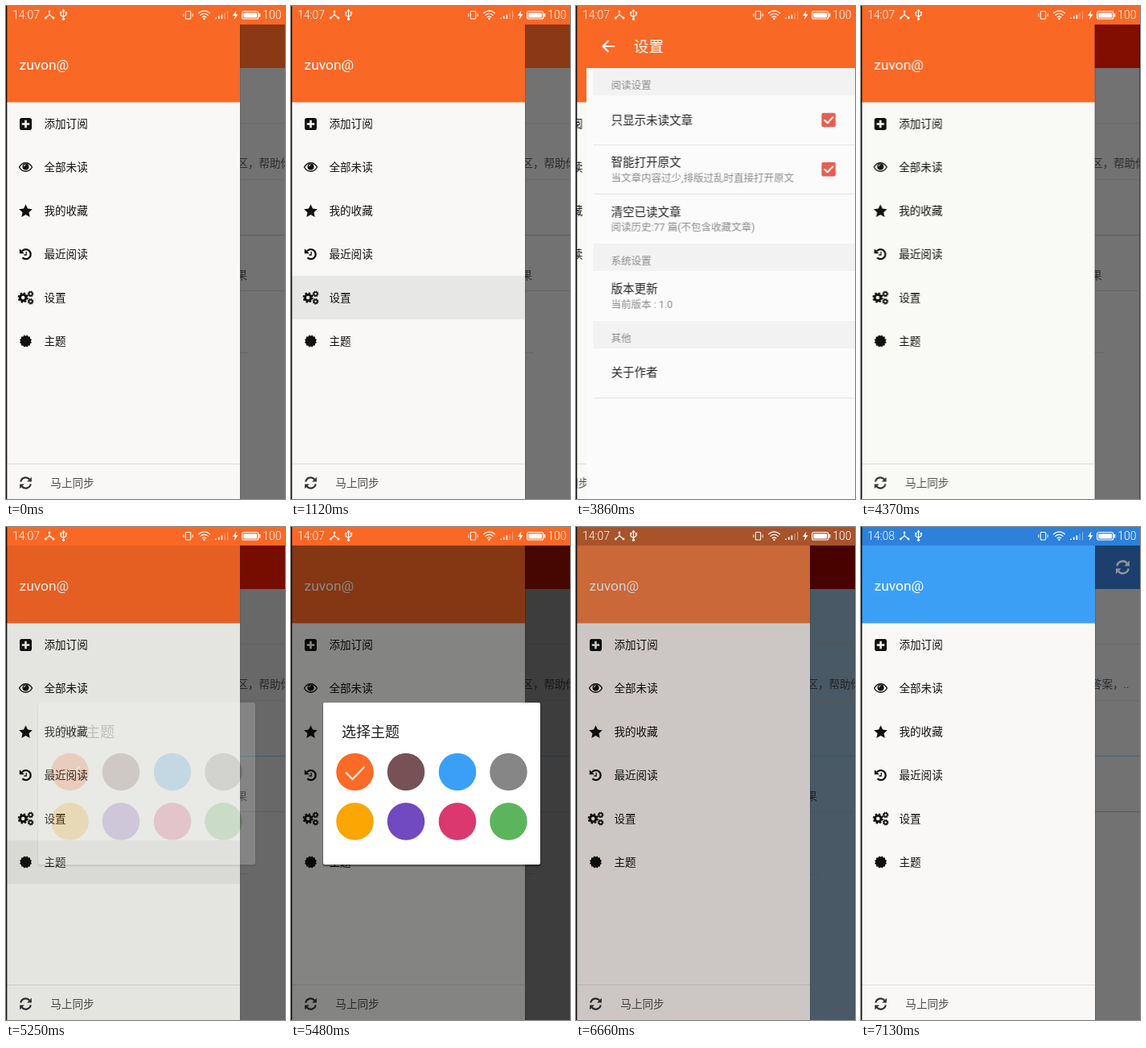
An HTML page for the animation above (8000 ms loop, 347 by 612 pixels).

```html
<!DOCTYPE html>
<html lang="zh-CN">
<head>
<meta charset="utf-8">
<title>Reader drawer</title>
<style>
html, body { margin: 0; width: 100%; height: 100%; overflow: hidden; background: #000; }
svg { display: block; width: 347px; height: 612px; }
text { font-family: Roboto, "Noto Sans CJK SC", "Noto Sans CJK", "Noto Sans", sans-serif; }
.light { font-weight: 300; fill: #fff; }
.item { font-size: 13.6px; fill: #111; }
.head { font-size: 14.5px; fill: #222; }
.sub { font-size: 12.5px; fill: #8a8a8a; }
.faded { font-size: 13.5px; fill: #292b2d; }
.line { fill: none; stroke: #fff; stroke-linecap: round; stroke-linejoin: round; }

.anim, .tint { animation: 8s linear infinite both; }
.settings { animation-name: settings; }
.under { animation-name: under; }
.dialog { animation-name: dialog; }
.dim { animation-name: dim; }
.statusDim { animation-name: statusDim; }
.pressSet { animation-name: pressSet; }
.pressTheme { animation-name: pressTheme; }
.before { animation-name: before; }
.after { animation-name: after; }
.header { animation-name: header; }
.status { animation-name: status; }
.bar { animation-name: bar; }
.page { animation-name: page; }
.drawer { animation-name: drawer; }

@keyframes settings {
  0% { transform: translateX(347px); }
  18.375% { transform: translateX(347px); animation-timing-function: cubic-bezier(.2, .5, .4, 1); }
  22.125%, 48.24% { transform: none; }
  48.25% { transform: translateX(12px); animation-timing-function: cubic-bezier(.35, .25, .3, 1); }
  55.25%, 100% { transform: translateX(347px); }
}
@keyframes under {
  0% { transform: none; }
  18.375% { transform: none; animation-timing-function: cubic-bezier(.2, .5, .4, 1); }
  22.125%, 48.24% { transform: translateX(-97px); }
  48.25% { transform: translateX(-93.6px); animation-timing-function: cubic-bezier(.35, .25, .3, 1); }
  55.25%, 100% { transform: none; }
}
@keyframes dialog {
  0%, 65% { opacity: 0; }
  68.4%, 80% { opacity: 1; }
  83%, 100% { opacity: 0; }
}
@keyframes dim {
  0%, 65% { opacity: 0; }
  68.4%, 80% { opacity: .47; }
  83.25% { opacity: .19; }
  84.625%, 100% { opacity: 0; }
}
@keyframes statusDim {
  0%, 80.375% { opacity: 0; }
  82.5%, 83.9% { opacity: .4; }
  84.625%, 100% { opacity: 0; }
}
@keyframes pressSet {
  0%, 13.99% { opacity: 0; }
  14%, 22% { opacity: .07; }
  22.1%, 100% { opacity: 0; }
}
@keyframes pressTheme {
  0%, 62.74% { opacity: 0; }
  62.75%, 65% { opacity: .07; }
  67%, 100% { opacity: 0; }
}
@keyframes before {
  0%, 86.2% { opacity: 1; }
  89.125%, 100% { opacity: 0; }
}
@keyframes after {
  0%, 86.2% { opacity: 0; }
  89.125%, 100% { opacity: 1; }
}
@keyframes header {
  0%, 80.375% { fill: #fa6825; }
  82.5%, 83.9% { fill: #f88045; }
  84.625%, 86.2% { fill: #fa6825; }
  89.125%, 100% { fill: #3ba0f5; }
}
@keyframes status {
  0%, 86.2% { fill: #fa6825; }
  89.125%, 100% { fill: #2d81db; }
}
@keyframes bar {
  0%, 48.24% { fill: #8b3814; }
  48.25%, 82.49% { fill: #810e00; }
  82.5%, 84.61% { fill: #590400; }
  84.625%, 86.2% { fill: #810e00; }
  89.125%, 100% { fill: #1c3f6d; }
}
@keyframes page {
  0%, 82.49% { fill: #727272; }
  82.5%, 84.61% { fill: #5a6e7c; }
  84.625%, 100% { fill: #727272; }
}
@keyframes drawer {
  0%, 48.24% { fill: #f9f8f6; }
  48.25%, 65% { fill: #f9faf5; }
  68.4%, 80.375% { fill: #f9f8f6; }
  82.5%, 83.9% { fill: #fbf5f3; }
  84.625%, 100% { fill: #f9f8f6; }
}
</style>
</head>
<body>
<svg viewBox="0 0 347 612">
  <defs>
    <g id="sync">
      <g id="half">
        <path d="M-6.2 -1.4A6.2 6.2 0 0 1 4.8 -4.2" fill="none" stroke="currentColor" stroke-width="2.2" />
        <path d="M7.4 -7.2V-1.4H1.6Z" fill="currentColor" />
      </g>
      <use href="#half" transform="rotate(180)" />
    </g>
    <g id="gear" fill="none" stroke="#111">
      <circle r="3.7" stroke-width="3" />
      <circle r="5.6" stroke-width="2" stroke-dasharray="2.4 2" />
    </g>
    <g id="check">
      <rect width="17.5" height="17.5" rx="2" fill="#e85d52" />
      <path class="line" d="M3.8 9L7.3 12.4L14 5.3" stroke-width="2" />
    </g>
  </defs>

  <g class="anim under">
    <rect class="tint page" y="23" width="347" height="589" />
    <rect class="tint bar" y="23" width="347" height="54" />
    <path d="M291 145.5H347M291 215.5H347" stroke="#696969" />
    <path d="M291 284.5H347" stroke="#4b6577" />
    <g class="anim before">
      <path d="M291 353.5H347M291 430.5H302" stroke="#656565" />
      <text class="faded" x="287.5" y="200">区，帮助你</text>
      <text class="faded" x="286.5" y="338.5">果</text>
    </g>
    <g class="anim after">
      <path d="M291 353.5H347" stroke="#4f5b63" />
      <text class="faded" x="286" y="200">答案，..</text>
      <use href="#sync" transform="translate(325.5 50) scale(1.15)" color="#8f9499" />
    </g>

    <rect x="291" y="23" width="1" height="589" opacity=".1" />
    <rect class="tint drawer" x="1" y="23" width="290" height="589" />
    <rect class="tint header" x="1" y="23" width="290" height="96.5" />
    <text x="16.5" y="78.5" font-size="17.4" fill="#fff">zuvon@</text>
    <rect class="anim pressSet" x="1" y="335" width="290" height="54" />
    <rect class="anim pressTheme" x="1" y="389" width="290" height="54" />
    <path d="M1 568.5H291" stroke="#dedddb" />

    <g class="item">
      <text x="47.4" y="151">添加订阅</text>
      <text x="47.4" y="205">全部未读</text>
      <text x="47.4" y="259">我的收藏</text>
      <text x="47.4" y="313">最近阅读</text>
      <text x="47.4" y="367">设置</text>
      <text x="47.4" y="421">主题</text>
      <text x="55.3" y="597" fill="#4b4b4b">马上同步</text>
    </g>

    <g fill="#111">
      <rect x="17" y="139" width="15" height="15" rx="2.8" />
      <path d="M24.5 141.8V151.2M19.8 146.5H29.2" stroke="#f9f8f6" stroke-width="2.6" />
      <g transform="translate(24.5 200)">
        <path d="M-8 0C-4 -7 4 -7 8 0C4 7 -4 7 -8 0Z" fill="none" stroke="#111" stroke-width="1.4" />
        <circle cy="-.6" r="4" />
        <path d="M-2.2 -.8A2.2 2.2 0 0 1 0 -3" fill="none" stroke="#f9f8f6" />
      </g>
      <path transform="translate(24.5 254.6)" d="M0 -8.4L2.5 -3L8.3 -2.4L4 1.6L5.2 7.4L0 4.5L-5.2 7.4L-4 1.6L-8.3 -2.4L-2.5 -3Z" />
      <g transform="translate(24.8 308.2)">
        <path d="M-4.8 -3.8A6 6 0 1 1 -4.4 4.2" fill="none" stroke="#111" stroke-width="2.3" />
        <path d="M-8 -7V-1H-2Z" />
        <path d="M.4 -3.2V.8H-2.4" fill="none" stroke="#111" stroke-width="1.3" />
      </g>
      <use href="#gear" transform="translate(21.2 362)" />
      <use href="#gear" transform="translate(30.6 357.4) scale(.58)" />
      <use href="#gear" transform="translate(30.6 366.8) scale(.58)" />
      <g transform="translate(24.5 416)">
        <rect id="seal" x="-5.5" y="-5.5" width="11" height="11" />
        <use href="#seal" transform="rotate(30)" />
        <use href="#seal" transform="rotate(60)" />
      </g>
    </g>
    <use href="#sync" transform="translate(24.5 592)" color="#333" />
  </g>

  <g class="anim settings">
    <rect x="1" width="347" height="612" fill="#fbfbfb" />
    <rect x="1" width="347" height="77" fill="#fa6825" />
    <path d="M9 77H341V111H9ZM9 295H341V329H9ZM9 391H341V425H9Z" fill="#f2f2f2" />
    <path d="M9 172.5H341M9 233.5H341M9 486.5H341" stroke="#e2e2e2" />
    <g transform="translate(-.7 0)">
      <path class="line" d="M35.5 50H22M28.2 43.5L21.7 50L28.2 56.5" stroke-width="2" />
      <text x="60" y="56.5" font-size="18.6" fill="#fff">设置</text>
      <g class="sub">
        <text x="32" y="102.7">阅读设置</text>
        <text x="32" y="217.7">当文章内容过少,排版过乱时直接打开原文</text>
        <text x="32" y="278.7">阅读历史:77 篇(不包含收藏文章)</text>
        <text x="32" y="320.7">系统设置</text>
        <text x="32" y="374.7">当前版本 : 1.0</text>
        <text x="32" y="416.7">其他</text>
      </g>
      <g class="head">
        <text x="32" y="146.5">只显示未读文章</text>
        <text x="32" y="199.3">智能打开原文</text>
        <text x="32" y="260.5">清空已读文章</text>
        <text x="32" y="356.3">版本更新</text>
        <text x="32" y="460.3">关于作者</text>
      </g>
      <use href="#check" x="293.7" y="132.8" />
      <use href="#check" x="293.7" y="194" />
    </g>
  </g>

  <rect class="anim dim" y="23" width="347" height="589" />

  <g class="anim dialog">
    <rect x="39" y="219" width="272" height="203" rx="3" opacity=".18" />
    <rect x="39.5" y="219" width="271" height="202" rx="3" opacity=".2" />
    <rect x="40" y="218" width="270" height="201" rx="2" fill="#fff" />
    <text x="63" y="260.5" font-size="18" fill="#222">选择主题</text>
    <g>
      <circle cx="79.5" cy="304" r="23.3" fill="#fb6a26" />
      <circle cx="143" cy="304" r="23.3" fill="#775155" />
      <circle cx="207" cy="304" r="23.3" fill="#3aa0f7" />
      <circle cx="270.5" cy="304" r="23.3" fill="#868686" />
      <circle cx="79.5" cy="365.5" r="23.3" fill="#fba602" />
      <circle cx="143" cy="365.5" r="23.3" fill="#7149c0" />
      <circle cx="207" cy="365.5" r="23.3" fill="#da386f" />
      <circle cx="270.5" cy="365.5" r="23.3" fill="#5cb55c" />
    </g>
    <path d="M68 304.5L76.5 313L91.5 297.5" fill="none" stroke="#fde3d6" stroke-width="2.4" />
  </g>

  <rect class="tint status" width="347" height="23" />
  <rect class="anim statusDim" width="347" height="23" fill="#2d3334" />
  <g class="light" font-size="14">
    <text class="anim before" x="8" y="16">14:07</text>
    <text class="anim after" x="8" y="16">14:08</text>
    <text x="319.3" y="16">100</text>
  </g>
  <g class="line" stroke-width="1.2">
    <path d="M54 7V11L49 15M54 11L59.3 15" />
    <path d="M71.5 6V16M68 8.5V11.5L71.5 13.5L75 11V8.5" />
    <rect x="223.3" y="6.5" width="6.4" height="9.5" rx="1" stroke-width="1.1" />
    <path d="M220.8 9.8V12.7M232.2 9.8V12.7" stroke-width="1" />
    <path d="M239.5 8.8Q246.5 2.8 253.5 8.8M241.8 11.4Q246.5 7.4 251.2 11.4M244.2 13.8Q246.5 12 248.8 13.8" />
    <path d="M261 14.5V16M264.7 12.5V16M268.4 10.5V16" stroke-linecap="butt" stroke-width="1.6" />
    <path d="M272 8.5V16M275.6 6.5V16" stroke-opacity=".4" />
    <rect x="293.7" y="6.5" width="20" height="9.5" rx="2" />
  </g>
  <g fill="#fff">
    <circle cx="54" cy="6.8" r="1.3" />
    <circle cx="49.3" cy="15" r="1.4" />
    <circle cx="59" cy="15" r="1.4" />
    <path d="M69.3 6.8L71.5 3.5L73.7 6.8Z" />
    <circle cx="71.5" cy="16.2" r="1.6" />
    <rect x="67" y="7" width="2.3" height="2.3" />
    <rect x="73.8" y="7" width="2.3" height="2.3" />
    <circle cx="246.5" cy="15.8" r="1.2" />
    <path d="M286.5 5.5L282 12H284.8L283.8 17L288.5 10.2H285.6Z" />
    <rect x="295.3" y="8.2" width="16.8" height="6.2" rx="1" />
    <rect x="314.5" y="9" width="1.8" height="4.5" />
  </g>
  <rect width="1.3" height="612" fill="#0c0c0c" />
</svg>
</body>
</html>
```
